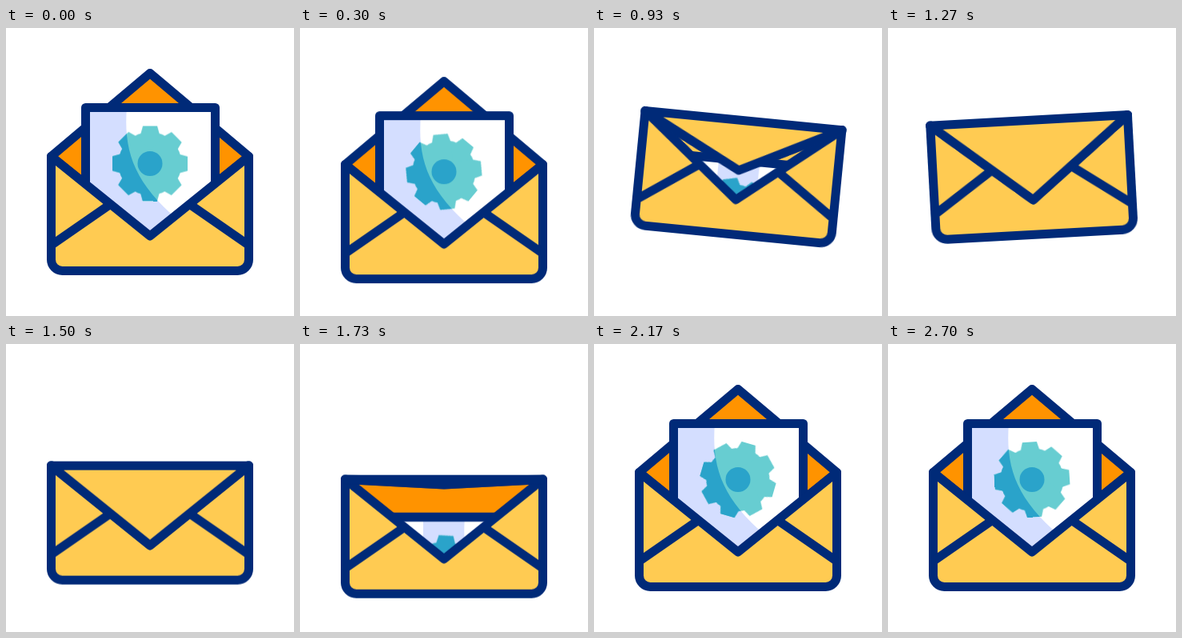
An HTML page for the animation above (2730 ms loop, 360 by 360 pixels).

```html
<!DOCTYPE html>
<html lang="en">
<head>
<meta charset="utf-8">
<title>Envelope with gear</title>
<style>
  :root {
    --navy: #002a78;
    --yellow: #ffcb52;
    --orange: #ff9300;
    --ease: cubic-bezier(.333, 0, .667, 1);
  }
  html, body { margin: 0; width: 100%; height: 100%; overflow: hidden; background: #fff; }
  svg { display: block; width: 100%; height: 100%; }

  .line { stroke: var(--navy); stroke-width: 11; stroke-linejoin: round; stroke-linecap: round; }
  .hop, .tilt, .letter, .shade, .back, .flap, .spin { animation: 2730ms var(--ease) infinite; }

  .hop { animation-name: hop; }
  .tilt { animation-name: tilt; transform-origin: 180px 232px; }
  .letter { animation-name: letter; }
  .shade { animation-name: slide; }
  .spin { animation-name: spin; animation-timing-function: linear; transform-origin: 0 0; }
  .back { animation-name: fold-back, tint; }
  .flap { animation-name: fold-front, show; animation-timing-function: var(--ease), step-end; }

  /* dips, jumps up, holds, drops and settles */
  @keyframes hop {
    0%, 72.05%, 100% { transform: translateY(0); }
    13.3%, 59.8% { transform: translateY(11px); }
    27%, 47.6% { transform: translateY(-45.2px); }
  }
  @keyframes tilt {
    0%, 25.64%, 51.28%, 100% { transform: rotate(0deg); }
    34.18% { transform: rotate(5.6deg); }
    42.75% { transform: rotate(-5.4deg); }
  }
  @keyframes letter {
    0%, 14.65%, 78.1%, 100% { transform: translateY(0); }
    31.1%, 61.9% { transform: translateY(111px); }
  }
  /* the shadow drifts right while the letter is tucked in */
  @keyframes slide {
    0%, 22%, 70.8%, 100% { transform: translateX(0); }
    30.5%, 63.4% { transform: translateX(55px); }
  }
  @keyframes spin { to { transform: rotate(360deg); } }

  @keyframes fold-back {
    0%, 20.77%, 71.8%, 100% { d: path("M56.5 160.5 L180 56.5 L303.5 160.5 L180 260 Z"); }
    39.08%, 55.93% { d: path("M56.5 160.5 L180 260 L303.5 160.5 L180 260 Z"); }
  }
  @keyframes fold-front {
    0%, 20.77%, 71.8%, 100% { d: path("M56.5 160.5 L180 56.5 L303.5 160.5 Z"); }
    39.08%, 55.93% { d: path("M56.5 160.5 L180 260 L303.5 160.5 Z"); }
  }
  @keyframes show {
    0%, 63.8%, 100% { opacity: 0; }
    30.07% { opacity: 1; }
  }
  @keyframes tint {
    0%, 30.4%, 63.2%, 100% { fill: var(--orange); }
    33.7%, 60.1% { fill: var(--yellow); }
  }
</style>
</head>
<body>
<svg viewBox="0 0 360 360">
  <defs>
    <path id="bar" d="M-12-36 L-9-47 H9 L12-36 V36 L9 47 H-9 L-12 36 Z"/>
    <g id="gear">
      <circle r="39.5"/>
      <use href="#bar"/>
      <use href="#bar" transform="rotate(45)"/>
      <use href="#bar" transform="rotate(90)"/>
      <use href="#bar" transform="rotate(135)"/>
    </g>
    <path id="shadow" d="M99 99 H151 C147 150 158 188 206 232 V290 H99 Z"/>
    <clipPath id="shaded"><use class="shade" href="#shadow"/></clipPath>
    <clipPath id="inside"><rect y="-60" width="360" height="360"/></clipPath>
  </defs>

  <g class="hop">
    <g class="tilt">
      <path class="back line" fill="#ff9300" d="M56.5 160.5 L180 56.5 L303.5 160.5 L180 260 Z"/>

      <g clip-path="url(#inside)">
        <g class="letter">
          <rect x="99.5" y="99.5" width="162" height="190" fill="#fff"/>
          <use class="shade" href="#shadow" fill="#d4deff"/>
          <g transform="translate(180 169.5)" fill="#67cdd1">
            <g class="spin"><use href="#gear"/></g>
          </g>
          <g clip-path="url(#shaded)">
            <g transform="translate(180 169.5)" fill="#2aa3ca">
              <g class="spin"><use href="#gear"/></g>
            </g>
          </g>
          <circle cx="180" cy="169.5" r="15.5" fill="#2aa3ca"/>
          <rect class="line" x="99.5" y="99.5" width="162" height="190" fill="none"/>
        </g>
      </g>

      <path class="line" fill="#ffcb52" d="M56.5 160.5 L180 260 L303.5 160.5 V289.5 a14 14 0 0 1 -14 14 H70.5 a14 14 0 0 1 -14 -14 Z"/>
      <path class="line" fill="none" d="M58 270.5 L128 222 M302 270.5 L232 222"/>
      <path class="flap line" fill="#ffcb52" opacity="0" d="M56.5 160.5 L180 56.5 L303.5 160.5 Z"/>
    </g>
  </g>
</svg>
</body>
</html>
```
